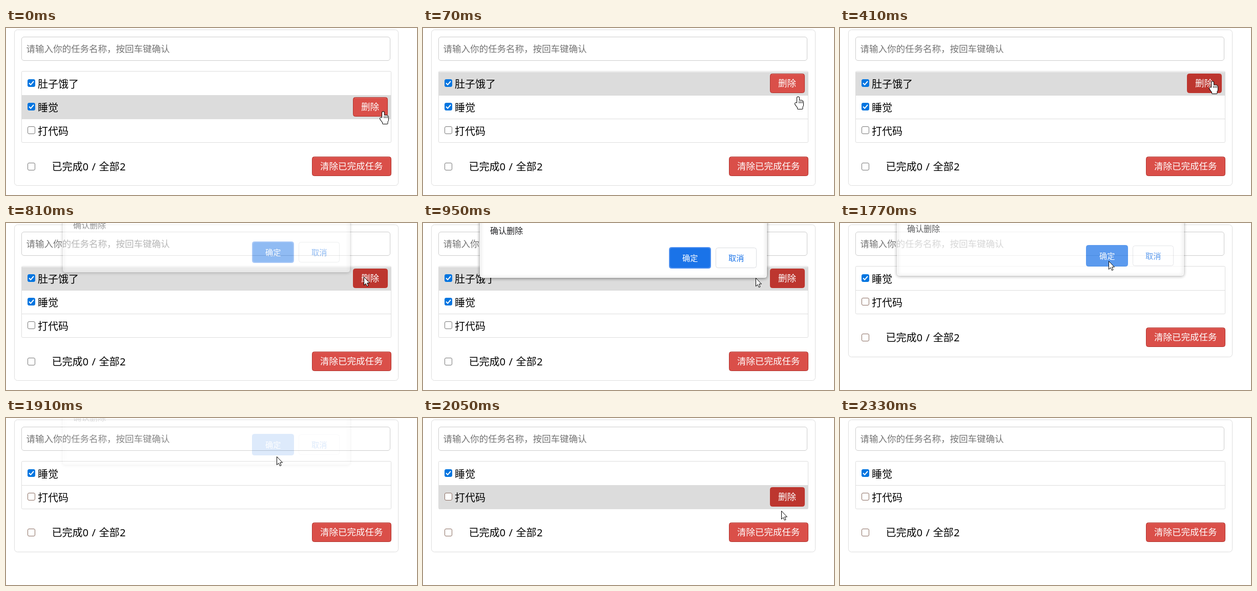
An HTML page with a canvas that plays this animation: 802x326 px, repeating every 2.81 s.

```html
<!DOCTYPE html>
<html lang="zh-CN">
<head>
<meta charset="utf-8">
<title>任务列表</title>
<style>
html, body { margin: 0; width: 100%; height: 100%; overflow: hidden; background: #fff; }
canvas { display: block; width: 802px; height: 326px; }
</style>
</head>
<body>
<canvas id="stage" width="802" height="326"></canvas>
<script>
const WIDTH = 802, HEIGHT = 326, LOOP = 2810;
const stage = document.getElementById('stage').getContext('2d');
const layer = new OffscreenCanvas(WIDTH, HEIGHT).getContext('2d');
let ctx = stage;

const CJK = '"Noto Sans CJK SC", "Noto Sans CJK", sans-serif';
const LATIN = '"Noto Sans", "Open Sans", sans-serif';
const RED = '#da4f49', DARK_RED = '#bd362f', RED_EDGE = '#b0332d', BLUE = '#1a73e8';

const TICK = 68.4;
const HOVER_FIRST = 1, BUTTON_DARK = 2, DIALOG_OPEN = 10, OK_HOVER = 17,
  DELETED = 26, DIALOG_GONE = 29, HOVER_SECOND = 30, POINTER_GONE = 34;

// Pointer path: tick, x, y
const PATH = [
  [0, 736, 163], [2, 727, 104], [6, 727, 104], [7, 714, 104], [10, 714, 104],
  [14, 649, 107], [17, 530, 87], [19, 483, 64], [21, 520, 73], [24, 520, 73],
  [28, 528, 75], [30, 699, 181], [33, 785, 308], [34, 812, 345]
];
const ARROW = new Path2D('M.5 .5V16.5L4 13.2L6.5 18.5L9 17.5L6.7 12H11.5Z');

const clamp = v => Math.max(0, Math.min(1, v));
const mix = (a, b, p) => a + (b - a) * p;

function pointerAt(tick) {
  const next = PATH.findIndex(key => key[0] > tick);
  if (next < 0) return PATH.at(-1).slice(1);
  const [t0, x0, y0] = PATH[next - 1], [t1, x1, y1] = PATH[next];
  const p = (tick - t0) / (t1 - t0);
  return [Math.round(mix(x0, x1, p)), Math.round(mix(y0, y1, p))];
}

function box(x, y, w, h, r, fill, stroke) {
  ctx.beginPath();
  ctx.roundRect(x + 0.5, y + 0.5, w - 1, h - 1, r);
  ctx.fillStyle = fill;
  ctx.fill();
  ctx.strokeStyle = stroke || fill;
  ctx.lineWidth = 1;
  ctx.stroke();
}

function rect(x, y, w, h, color) {
  ctx.fillStyle = color;
  ctx.fillRect(x, y, w, h);
}

// Text placed by its left edge and the middle of its glyphs
function label(str, x, midY, size, color, weight = 400, family = CJK) {
  ctx.font = `${weight} ${size}px ${family}`;
  ctx.fillStyle = color;
  ctx.fillText(str, x, midY + size * 0.41);
}

function checkbox(y, checked, border) {
  if (!checked) return box(42, y, 15, 15, 2.5, '#fff', border);
  box(42, y, 15, 15, 2.5, '#0075e0');
  ctx.beginPath();
  ctx.moveTo(45, y + 7.5);
  ctx.lineTo(48.2, y + 10.8);
  ctx.lineTo(54, y + 4);
  ctx.strokeStyle = '#fff';
  ctx.lineWidth = 2;
  ctx.stroke();
}

function redButton(str, x, y, w, dark) {
  box(x, y, w, 38, 4, dark ? DARK_RED : RED, dark ? DARK_RED : RED_EDGE);
  if (!dark) rect(x + 4, y + 1, w - 8, 1, 'rgba(255,255,255,.2)');
  label(str, x + 16, y + 18, 17.5, '#fff');
}

function drawPage(tick) {
  const deleted = tick >= DELETED;
  const tasks = [['肚子饿了', true], ['睡觉', true], ['打代码', false]].slice(deleted ? 1 : 0);
  const listEnd = 86 + 46 * tasks.length;
  const footer = deleted ? 204 : 251;
  const border = deleted ? '#8a6c60' : '#767676';
  const onSecond = tick < HOVER_FIRST || tick === HOVER_SECOND;
  const hovered = onSecond ? 1 : deleted ? -1 : 0;

  box(16, 3, 750, listEnd + 81, 6, '#fff', '#ddd');
  box(30, 17, 720, 47, 4.5, '#fff', '#ccc');
  label('请输入你的任务名称，按回车键确认', 39.5, 39.6, 17.5, '#757575');

  box(30, 84, 722, listEnd - 84, 2, '#fff', '#ddd');
  tasks.forEach(([name, done], i) => {
    const y = 85 + 46 * i;
    if (i < tasks.length - 1) rect(31, y + 46, 720, 1, '#ddd');
    if (i === hovered) {
      rect(31, y + 1 - i, 720, 46 + i, '#dcdcdc');
      redButton('删除', 677, y + 4, 68, tick >= BUTTON_DARK);
    }
    checkbox(y + 15, done, border);
    label(name, 62, y + 24, 20, '#000');
  });

  checkbox(footer + 12, false, border);
  const mid = footer + 19;
  label('已完成', 89.5, mid, 20, '#000');
  label('0', 149.5, mid - 0.5, 20, '#000', 400, LATIN);
  label('/', 167.5, mid - 0.5, 20, '#000', 400, LATIN);
  label('全部', 181.5, mid, 20, '#000');
  label('2', 222, mid - 0.5, 20, '#000', 400, LATIN);
  redButton('清除已完成任务', 597, footer, 155, false);
}

function drawDialog(tick) {
  if (tick < DIALOG_OPEN || tick >= DIALOG_GONE) return;
  const opening = clamp((tick - 9.4) / 5.3);
  const closing = clamp((tick - 25) / 3.5);
  const hover = tick >= OK_HOVER && tick < DELETED;
  const weight = opening < 1 || closing > 0 ? 500 : 400;

  // Drawn on its own layer so that it fades as one piece
  ctx = layer;
  ctx.clearRect(0, 0, WIDTH, HEIGHT);
  ctx.save();
  ctx.translate(0, Math.round(-18 * (1 - opening) - 21 * closing));
  ctx.save();
  ctx.shadowColor = 'rgba(0,0,0,.45)';
  ctx.shadowBlur = 6;
  ctx.shadowOffsetY = 1;
  box(111, -60, 560, 169, 4, '#fff');
  ctx.restore();
  label('确认删除', 131, 16.5, 16, '#202124');
  box(480, 49, 82, 42, 4, closing ? BLUE : '#4d8ff0');
  box(482, 51, 78, 38, 3, hover ? '#327de3' : BLUE);
  label('确定', 506, 69.5, 15.2, '#fff', weight);
  box(571, 50, 80, 40, 4, '#fff', '#dadce0');
  label('取消', 596, 69.5, 15.2, BLUE, weight);
  ctx.restore();

  ctx = stage;
  ctx.globalAlpha = Math.min(1, opening * 1.6) * (1 - closing);
  ctx.drawImage(layer.canvas, 0, 0);
  ctx.globalAlpha = 1;
}

function handShape() {
  const shape = new Path2D();
  shape.roundRect(-2, 0.5, 4, 16, 2);
  shape.roundRect(-2, 7.5, 12, 13, 4);
  shape.roundRect(-1, 15, 9.5, 9, 1);
  const thumb = new Path2D();
  thumb.roundRect(-2, -4.5, 4, 10, 2);
  shape.addPath(thumb, new DOMMatrix().translate(-2.5, 16).rotate(-35));
  return shape;
}
const HAND = handShape();

function drawPointer(tick) {
  if (tick >= POINTER_GONE) return;
  const hand = tick < DIALOG_OPEN;
  const shape = hand ? HAND : ARROW;
  ctx.save();
  ctx.translate(...pointerAt(tick));
  ctx.strokeStyle = '#000';
  ctx.lineWidth = hand ? 2 : 1;
  ctx.lineJoin = 'round';
  ctx.fillStyle = '#fff';
  if (hand) {
    ctx.stroke(shape);
    ctx.fill(shape);
    for (let x = 2; x < 9; x += 3) rect(x - 0.5, 9, 1, 4, '#000');
  } else {
    ctx.fill(shape);
    ctx.stroke(shape);
  }
  ctx.restore();
}

const start = performance.now();

function render() {
  const time = (performance.now() - start) % LOOP;
  const tick = Math.floor((time + 8) / TICK);
  rect(0, 0, WIDTH, HEIGHT, '#fff');
  drawPage(tick);
  drawDialog(tick);
  drawPointer(tick);
  requestAnimationFrame(render);
}
render();
</script>
</body>
</html>
```
